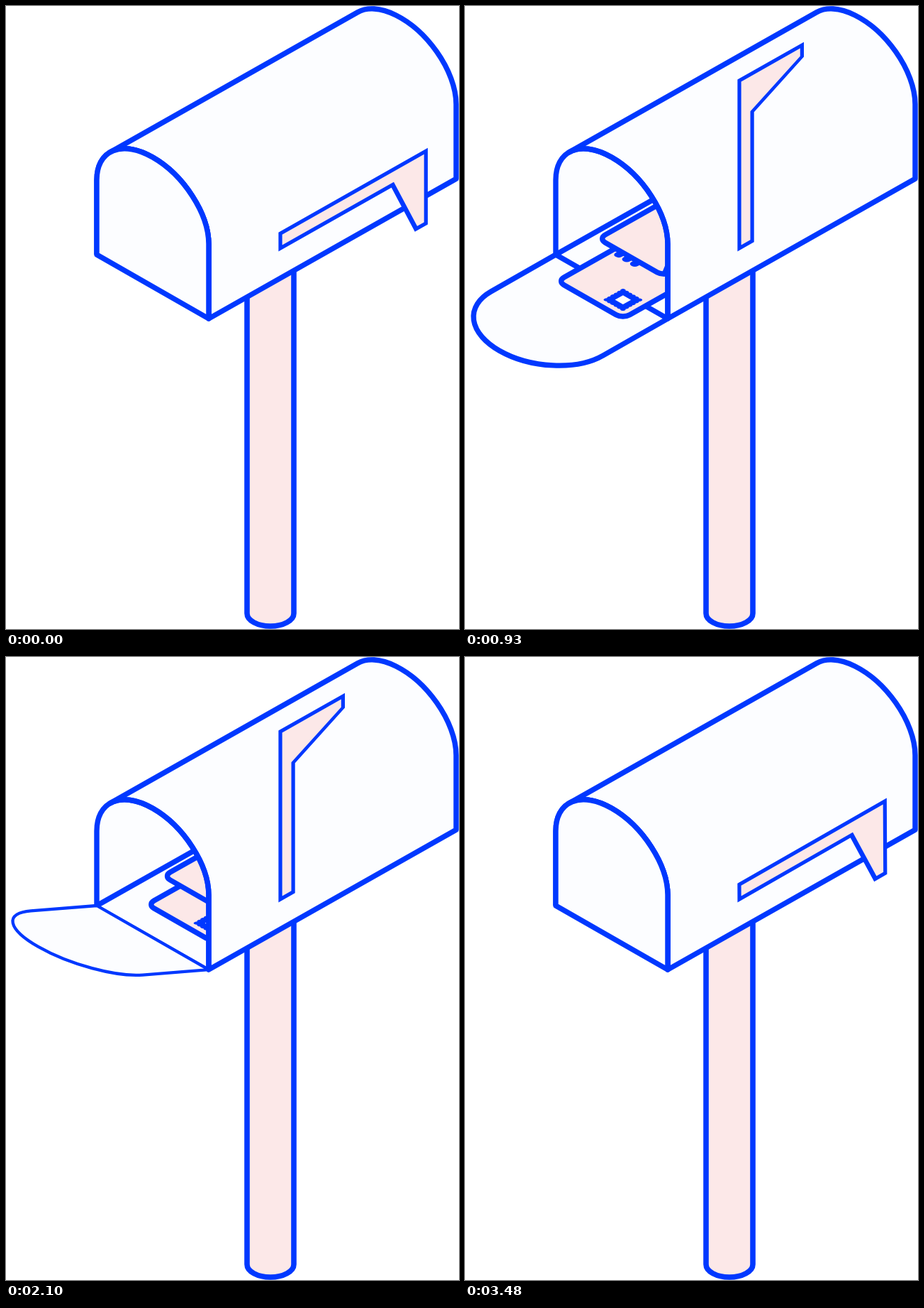
Write an HTML page with a canvas that moves like this. It is 639 px wide and 877 px high and loops after 3.6 s.

```html
<!DOCTYPE html>
<html lang="en">
<head>
<meta charset="utf-8">
<title>Mailbox</title>
<style>
  html, body { margin: 0; width: 100%; height: 100%; overflow: hidden; background: #fff; }
  canvas { display: block; }
</style>
</head>
<body>
<canvas id="stage" width="639" height="877"></canvas>
<script>
const ctx = document.getElementById('stage').getContext('2d');
const BLUE = '#0038ff', PINK = '#fce8e8', PALE = '#fcfdff';
const LOOP = 3600, STEP = 30, LINE = 7.4;

// Front face in local units: s runs along the hinge, h runs up the face.
const W = 182.4, R = W / 2, SIDE = 105, RISE = 77;
const BACK_S = 403, BACK_H = 396;
const TANGENT = 139.3 * Math.PI / 180;
const face = (dx, dy) => new DOMMatrix([.866, .494, dx, dy, 128, 350]);
const FRONT = face(0, -1);

const sine = p => (1 - Math.cos(Math.PI * p)) / 2;
const quadIn = p => p * p;
const tween = (t, start, length, ease = sine) =>
  ease(Math.min(1, Math.max(0, (t - start) / length)));

function placed(path, matrix) {
  const result = new Path2D();
  result.addPath(path, matrix);
  return result;
}

function paint(path, fill, width) {
  if (fill) { ctx.fillStyle = fill; ctx.fill(path); }
  ctx.lineWidth = width;
  ctx.strokeStyle = BLUE;
  ctx.stroke(path);
}

// Runs draw with local axes, so that line weights are foreshortened too.
function within(matrix, draw) {
  ctx.save();
  ctx.setTransform(matrix);
  draw();
  ctx.restore();
}

const arch = new Path2D();
arch.moveTo(0, 0);
arch.lineTo(0, SIDE);
arch.ellipse(R, SIDE, R, RISE, 0, Math.PI, 0, true);
arch.lineTo(W, 0);

const door = new Path2D(arch);
door.closePath();

const shell = new Path2D();
shell.moveTo(W, 0);
shell.lineTo(W, SIDE);
shell.ellipse(R, SIDE, R, RISE, 0, 0, TANGENT);
shell.ellipse(R + BACK_S, SIDE + BACK_H, R, RISE, 0, TANGENT, 0, true);
shell.lineTo(W + BACK_S, BACK_H);
shell.closePath();

const frontArch = placed(arch, FRONT);
const shellSide = placed(shell, FRONT);
const post = new Path2D('M340 380V855A33 18 0 0 0 406 855V350Z');
const floorEdge = new Path2D('M128 350L286 261');
const sill = new Path2D('M128 350L286 440');
const flag = new Path2D('M0 0V236H101.6V220L20.8 182V0Z');

const sheet = new Path2D();
sheet.roundRect(0, 0, 107, 169, 11);
const flap = new Path2D('M2 2L53.5 84.5L2 167');
const stamp = new Path2D('M16.5 16.5h21v21h-21Z');
const perforation = new Path2D('M13.5 13.5h27v27h-27Z');
const address = new Path2D('M95 88V140M82 88V140M69 88V140');

function drawLetter(x, y, depth, details) {
  const matrix = new DOMMatrix([-.866, -.494, .87, -.49, x + .87 * depth, y - .49 * depth]);
  paint(placed(sheet, matrix), PINK, LINE);
  details(matrix);
}

function drawLetters(lower, upper) {
  drawLetter(200, 453, lower, matrix => within(matrix, () => {
    ctx.lineCap = 'round';
    paint(address, null, 11);
    paint(stamp, '#fff', 8);
    ctx.setLineDash([0, 5.4]);
    paint(perforation, null, 6);
  }));
  drawLetter(201.5, 425, upper, matrix => paint(placed(flap, matrix), null, LINE));
}

function drawDoor(angle) {
  const reach = 1 + .15 * Math.sin(2 * angle);
  const forward = Math.sin(angle) * reach, up = Math.cos(angle) * reach;
  const matrix = face(-.87 * forward, .497 * forward - up);
  const area = Math.abs(matrix.a * matrix.d - matrix.b * matrix.c);
  paint(placed(door, matrix), PALE, LINE * area / .866);
}

function drawFlag(lowered) {
  const matrix = new DOMMatrix([.87, -.491, 0, -1, 387, 341])
    .translate(10.4, 10.4).rotate(-90 * lowered).translate(-10.4, -10.4);
  within(matrix, () => {
    ctx.lineJoin = 'miter';
    paint(flag, PINK, 6);
  });
}

function render(t) {
  const open = tween(t, 276, 667) - tween(t, 1822, 548, quadIn);
  const angle = open * Math.PI / 2;
  const inside = angle < .82;
  const lower = 143 * (1 - tween(t, 585, 480) + tween(t, 1784, 480));
  const upper = 147 * (1 - tween(t, 727, 480) + tween(t, 1726, 480));

  ctx.clearRect(0, 0, 639, 877);
  ctx.lineJoin = 'round';
  paint(post, PINK, 7.6);
  ctx.fillStyle = PALE;
  ctx.fill(frontArch);
  paint(floorEdge, null, LINE);
  paint(sill, null, 4);
  if (!inside) drawDoor(angle);
  drawLetters(lower, upper);
  paint(shellSide, PALE, LINE);
  paint(frontArch, null, LINE);
  if (inside) drawDoor(angle);
  drawFlag(1 - tween(t, 0, 630) + tween(t, 2735, 775));
}

function tick(now) {
  render(Math.floor(now % LOOP / STEP) * STEP);
  requestAnimationFrame(tick);
}
tick(performance.now());
</script>
</body>
</html>
```
